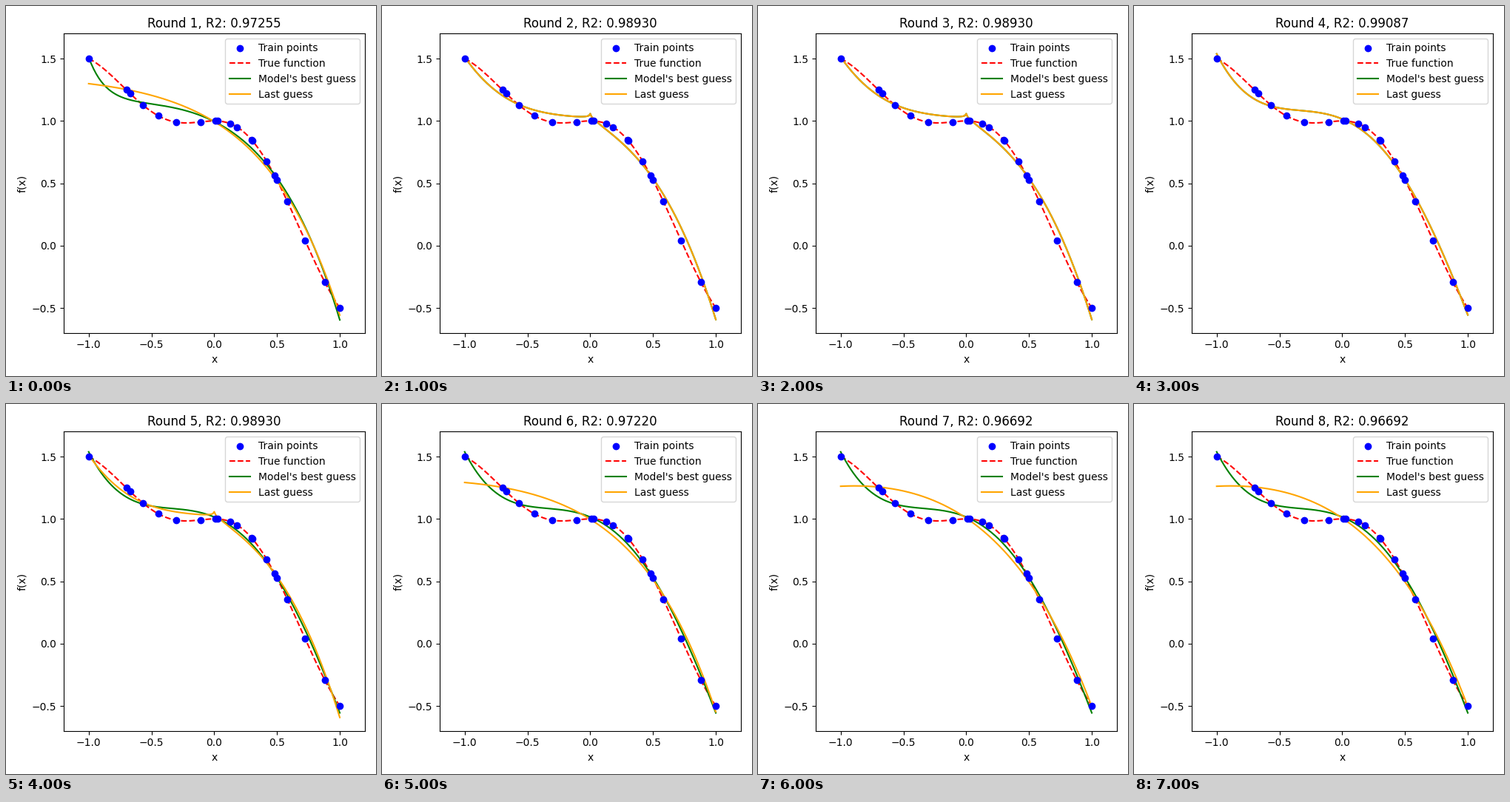
Animation of 500 by 500 pixels, one loop 8 s. Source, as a matplotlib script:

```python
import numpy as np
import matplotlib.pyplot as plt
from matplotlib.animation import FuncAnimation

plt.rcParams["font.family"] = "DejaVu Sans"


def true_f(x):
    return (x**5 - 3 * x**3 + 1) / (x**2 + 1)


train_x = np.array([-1, -.7, -.67, -.57, -.447, -.303, -.107, .01, .03, .13,
                    .183, .297, .302, .418, .48, .5, .583, .724, .88, 1])
train_y = true_f(train_x)
grid = np.linspace(-1, 1, 201)


def fit(*terms):
    """Least-squares fit of a constant plus terms, sampled on the grid."""
    def design(x):
        return np.column_stack([np.ones_like(x)] + [t(x) for t in terms])
    coefs = np.linalg.lstsq(design(train_x), train_y, rcond=None)[0]
    return design(grid) @ coefs


def power(n):
    return lambda x: x**n


def growth(rate):
    return lambda x: np.exp(rate * x)


def root(x):
    return np.sqrt(np.abs(x))


linear = power(1)
cubic = [power(n) for n in (1, 2, 3)]

# each guess is a curve and its score
early = fit(linear, growth(1.5), growth(-7)), 0.98
single_exp = fit(growth(1.63)), 0.97255
cusp = fit(*cubic, root), 0.98930
quartic = fit(*cubic, power(4)), 0.99087
steep = fit(linear, growth(1.5)), 0.97220
humped = fit(linear, growth(1)), 0.96692

guesses = [single_exp, cusp, cusp, quartic, cusp, steep, humped, humped]

fig, ax = plt.subplots(figsize=(5, 5), dpi=100)
ax.scatter(train_x, train_y, color="blue", zorder=3, label="Train points")
ax.plot(grid, true_f(grid), "--", color="red", label="True function")
best_line, = ax.plot(grid, early[0], color="green", label="Model's best guess")
last_line, = ax.plot(grid, single_exp[0], color="orange", label="Last guess")
ax.set(xlim=(-1.2, 1.2), ylim=(-0.7, 1.7), xlabel="x", ylabel="f(x)")
ax.set_xticks(np.arange(-1, 1.1, 0.5))
ax.set_yticks(np.arange(-0.5, 1.6, 0.5))
ax.legend(loc="upper right")
title = ax.set_title("Round 1, R2: 0.97255")
fig.tight_layout()


def update(i):
    last, score = guesses[i]
    best, _ = max([early] + guesses[:i + 1], key=lambda guess: guess[1])
    best_line.set_ydata(best)
    last_line.set_ydata(last)
    title.set_text(f"Round {i + 1}, R2: {score:.5f}")
    return best_line, last_line, title


anim = FuncAnimation(fig, update, frames=len(guesses), interval=1000,
                     repeat=True, repeat_delay=0)
plt.show()
```
